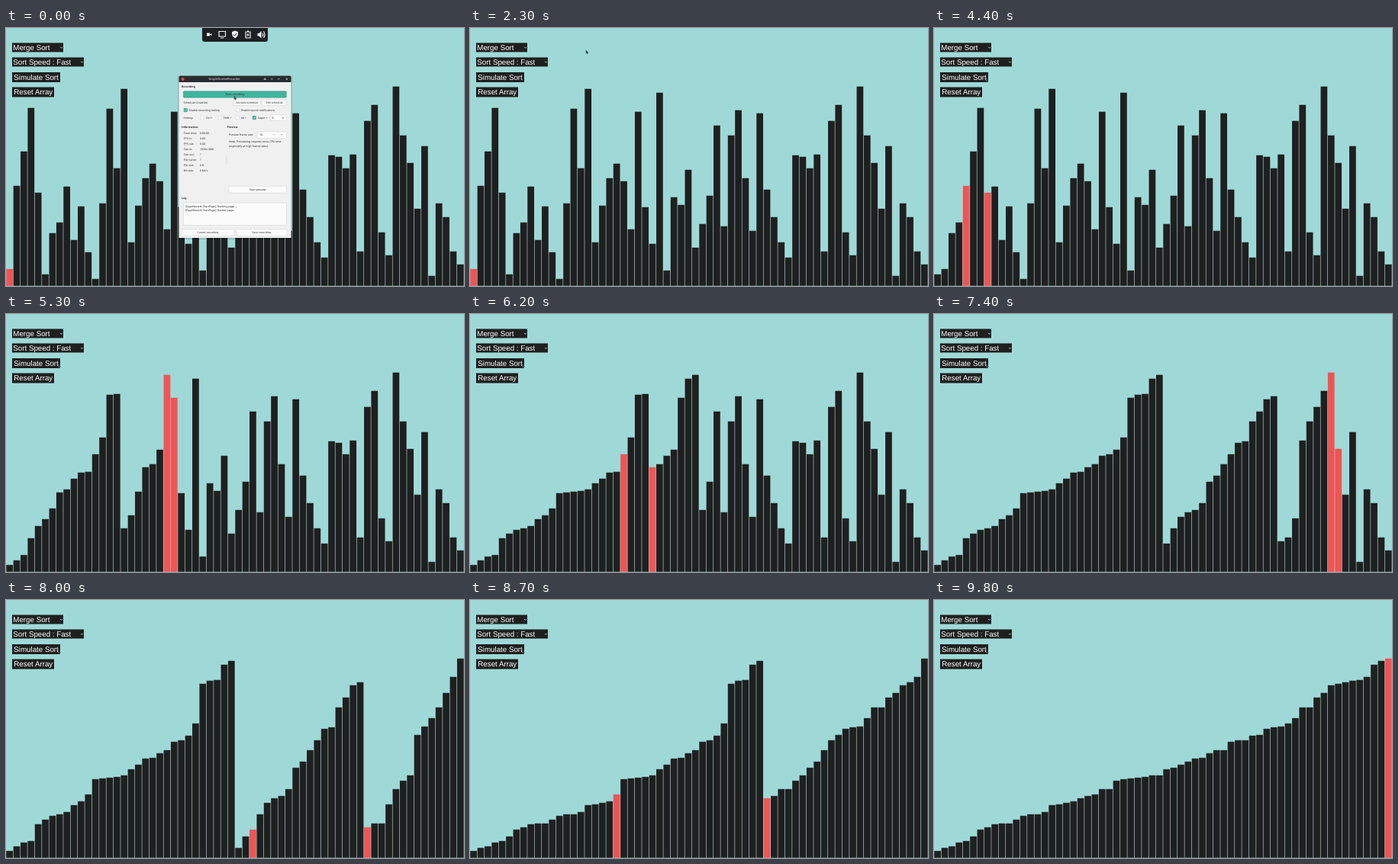
Animation, 600 px wide and 338 px high, one loop 10 s. Source, as an HTML page with a canvas:

```html
<!DOCTYPE html>
<html lang="en">
<head>
<meta charset="utf-8">
<title>Merge Sort</title>
<style>
html, body { margin: 0; width: 100%; height: 100%; overflow: hidden; background: #9ed9d8; }
canvas, svg { position: absolute; left: 0; top: 0; width: 600px; height: 338px; }
text { text-rendering: geometricPrecision; }
.menu rect { fill: #1f1f1f; }
.menu text { font: 9.75px "Liberation Sans", Arial, sans-serif; fill: #fff; }
.menu path { fill: none; stroke: #ddd; stroke-width: .8; }
#dialog text { font: 3.55px "Noto Sans", sans-serif; fill: #2c2c2c; }
#dialog .head { font-weight: 700; }
#dialog .mid { text-anchor: middle; }
#dialog .title { font-size: 3.95px; fill: #e4e4e4; text-anchor: middle; }
.btn { fill: #fbfbfb; stroke: #c6c6c6; stroke-width: .4; }
.on { fill: #3fb59d; stroke: #2b8b78; stroke-width: .4; }
#panel .line { fill: none; stroke: #f0f0f0; stroke-width: 1.2; stroke-linejoin: round; }
#panel .fill { fill: #f0f0f0; }
</style>
</head>
<body>
<canvas id="bars" width="600" height="338"></canvas>
<svg viewBox="0 0 600 338">
  <g class="menu">
    <rect x="8" y="19.5" width="67" height="12"/><text x="9.3" y="29">Merge Sort</text>
    <path d="M71 25l1.5 1.3 1.5-1.3"/>
    <rect x="8" y="38.5" width="94" height="12"/><text x="9.3" y="48">Sort Speed : Fast</text>
    <path d="M98 44l1.5 1.3 1.5-1.3"/>
    <rect x="8" y="58" width="63" height="13"/><text x="10.3" y="68">Simulate Sort</text>
    <rect x="8" y="77.5" width="55" height="13"/><text x="10.3" y="87.3">Reset Array</text>
  </g>
  <g id="panel">
    <rect x="257" y="-4" width="86" height="22" rx="3" fill="#1c2023"/>
    <path class="fill" d="M263 6.5h4v4h-4zM267 8.5l2.3-1.8v3.6z"/>
    <path class="line" d="M279 4.5h8.500v6.500h-8.500zM281 13h4.500"/>
    <path class="fill" d="M300 3.500l4 1.500v3.500q-.5 3-4 5q-3.500-2-4-5v-3.500z"/>
    <path d="M298 8.500l1.500 1.700 2.700-3.200" fill="none" stroke="#1c2023" stroke-width="1"/>
    <path class="line" d="M314 5h6v8h-6zM316 4h2"/>
    <path class="fill" d="M317.600 6l-2.600 3.500h1.800l-.6 2.500 2.700-3.500h-1.800z"/>
    <path class="fill" d="M329.500 7h2l3-3v9.500l-3-3h-2z"/>
    <path class="line" d="M336 6.500q1.500 2 0 4.500M337.500 4.500q3 4 0 8.500"/>
  </g>
  <g id="dialog">
    <rect x="225" y="62" width="150" height="215" rx="2" fill="#000" opacity=".15"/>
    <rect x="226.500" y="62" width="147" height="213" fill="#f0f0f0"/>
    <path d="M226.500 71V64q0-1.500 1.500-1.500h144q1.500 0 1.500 1.500v7z" fill="#292c2e"/>
    <circle cx="231.500" cy="67" r="2" fill="#d85050"/>
    <text class="title" x="286" y="68.300">SimpleScreenRecorder</text>
    <path d="M338 67.500l1.300-2 1.300 2zM347 66l1.300 1.500 1.300-1.500M356 67.500l1.300-1.500 1.300 1.500M366.500 65.500l2.500 2.500M369 65.500l-2.500 2.500" fill="none" stroke="#eee" stroke-width=".6"/>
    <rect class="on" x="232.300" y="82.700" width="135" height="8.500" rx="1"/>
    <path d="M289 167v11" stroke="#c8c8c8" stroke-width=".5"/>
  </g>
  <path id="cursor" d="M0 0V4.700L1.100 3.800 1.900 5.500 2.800 5.100 2 3.500H3.500Z" fill="#303338" stroke="#7f9c9d" stroke-width=".3"/>
</svg>
<script>
const $ = id => document.getElementById(id);
const LOOP = 10000, FRAME = 100, STEP = 600 / 64;

// Dialog contents
const dialog = $('dialog');
function add(tag, attrs, content = '') {
  const el = document.createElementNS('http://www.w3.org/2000/svg', tag);
  for (const key in attrs) el.setAttribute(key, attrs[key]);
  el.textContent = content;
  dialog.append(el);
}
const label = (x, y, s, cls = '') => add('text', { x, y, class: cls }, s);
const box = (x, y, width, height, cls = 'btn') => add('rect', { x, y, width, height, rx: 0.7, class: cls });
function button(x, y, w, h, s) {
  box(x, y, w, h);
  label(x + w / 2, y + h / 2 + 1.3, s, 'mid');
}
function check(x, y, s, on) {
  box(x, y, 4.5, 4.5, on ? 'on' : 'btn');
  if (on) add('path', { d: `M${x + 1} ${y + 2.2}l1 1 1.600-2`, fill: 'none', stroke: '#fff', 'stroke-width': 0.5 });
  label(x + 6.7, y + 3.5, s);
}
label(230, 77.6, 'Recording', 'head');
label(300, 88.2, 'Start recording', 'mid');
label(232.5, 99, 'Schedule: (inactive)');
button(298, 93.5, 35.5, 8, 'Activate schedule');
button(335.5, 93.5, 32, 8, 'Edit schedule');
check(233, 105.3, 'Enable recording hotkey', true);
check(301.5, 105.3, 'Enable sound notifications');
label(232.5, 119, 'Hotkey:');
check(255, 115.3, 'Ctrl +');
check(278, 115.3, 'Shift +');
check(301, 115.3, 'Alt +');
check(323, 115.3, 'Super +', true);
box(346, 113.5, 21.5, 8);
label(348.5, 119, 'R');
label(362, 118.8, '▾');
label(230, 130.7, 'Information', 'head');
label(289.5, 130.7, 'Preview', 'head');
[['Total time:', '0:00:00'], ['FPS in:', '0.00'], ['FPS out:', '0.00'], ['Size in:', '1920x1080'],
 ['Size out:', '?'], ['File name:', '?'], ['File size:', '0 B'], ['Bit rate:', '0 bit/s']
].forEach(([name, value], n) => {
  label(232.7, 139.3 + n * 6.95, name);
  label(254, 139.3 + n * 6.95, value);
});
label(292, 141.3, 'Preview frame rate:');
box(329, 135.7, 38.5, 8.8);
label(332, 141.3, '10');
label(351, 141.3, '−', 'mid');
label(361.5, 141.3, '+', 'mid');
label(292, 150, 'Note: Previewing requires extra CPU time');
label(292, 155.6, '(especially at high frame rates).');
button(292, 207.3, 75.5, 8.7, 'Start preview');
label(230, 224, 'Log', 'head');
box(232.500, 229, 135, 29.5);
label(235, 235, '[PageRecord::StartPage] Starting page ...');
label(235, 240.4, '[PageRecord::StartPage] Started page.');
button(230, 263.5, 69, 9, 'Cancel recording');
button(301.5, 263.5, 66.5, 9, 'Save recording');

// Top edges of the bars, unsorted
const tops = [
  316, 207, 162, 105, 216, 323, 269, 255, 208, 278, 234, 294, 329, 230, 106, 184,
  80, 281, 233, 197, 178, 201, 264, 110, 235, 283, 85, 318, 222, 232, 186, 288,
  257, 220, 128, 260, 141, 108, 197, 266, 112, 212, 248, 281, 301, 167, 169, 184,
  166, 293, 122, 101, 268, 298, 77, 141, 177, 237, 155, 325, 230, 248, 293, 310];

// In-place merge sort, recording every step
const steps = [];
const snap = (i, j) => steps.push({ tops: tops.slice(), i, j });
function sort(lo, hi) {
  if (lo === hi) return;
  const mid = (lo + hi) >> 1;
  sort(lo, mid);
  sort(mid + 1, hi);
  let i = lo, j = mid + 1;
  for (let k = lo; k <= hi; k++) {
    if (i === j) j++;
    else if (j > hi || tops[i] >= tops[j]) i++;
    else tops.splice(i++, 0, tops.splice(j++, 1)[0]);
    snap(i, j);
  }
}
snap(0, 0);
sort(0, 63);

// Piecewise linear track: rows of [time, ...values]
function track(rows, t) {
  let n = rows.findIndex(row => row[0] > t);
  if (n < 0) return rows[rows.length - 1].slice(1);
  if (n === 0) return rows[0].slice(1);
  const a = rows[n - 1], b = rows[n], p = (t - a[0]) / (b[0] - a[0]);
  return a.slice(1).map((v, k) => v + (b[k + 1] - v) * p);
}
const progress = [[4100, 0], [5200, 74], [5300, 86], [6200, 149], [7400, 248], [8500, 326], [8700, 340], [9330, 384]];
const pointer = [[300, 298.7, 89], [700, 330, 76], [1000, 348, 66.5], [1700, 348, 66.5], [1900, 292, 34],
  [2100, 212, 14], [2300, 151.8, 28.8], [2500, 108, 47], [2800, 77, 67], [3100, 68.3, 65.3]];
const dialogFade = [[1100, 1], [1500, 0]];
const panelShift = [[1200, 0], [1600, -20]];

const ctx = $('bars').getContext('2d');
function draw(t) {
  const { tops, i, j } = steps[Math.floor(track(progress, t)[0] + 1e-6)];
  ctx.fillStyle = '#9ed9d8';
  ctx.fillRect(0, 0, 600, 338);
  tops.forEach((top, n) => {
    ctx.fillStyle = n === i || n === j ? '#f05454' : '#1f1f1f';
    ctx.fillRect(n * STEP + 0.3, top - 0.3, STEP - 0.65, 338 - top);
  });
  const [fade] = track(dialogFade, t), scale = 0.9 + 0.1 * fade;
  dialog.setAttribute('opacity', fade);
  dialog.setAttribute('transform', `translate(300 168) scale(${scale}) translate(-300 -168)`);
  $('panel').setAttribute('transform', `translate(0 ${track(panelShift, t)[0]})`);
  $('cursor').setAttribute('transform', `translate(${track(pointer, t)})`);
}

const start = performance.now();
function tick() {
  const t = (performance.now() - start) % LOOP;
  draw(Math.floor(t / FRAME) * FRAME);
  requestAnimationFrame(tick);
}
tick();
</script>
</body>
</html>
```
